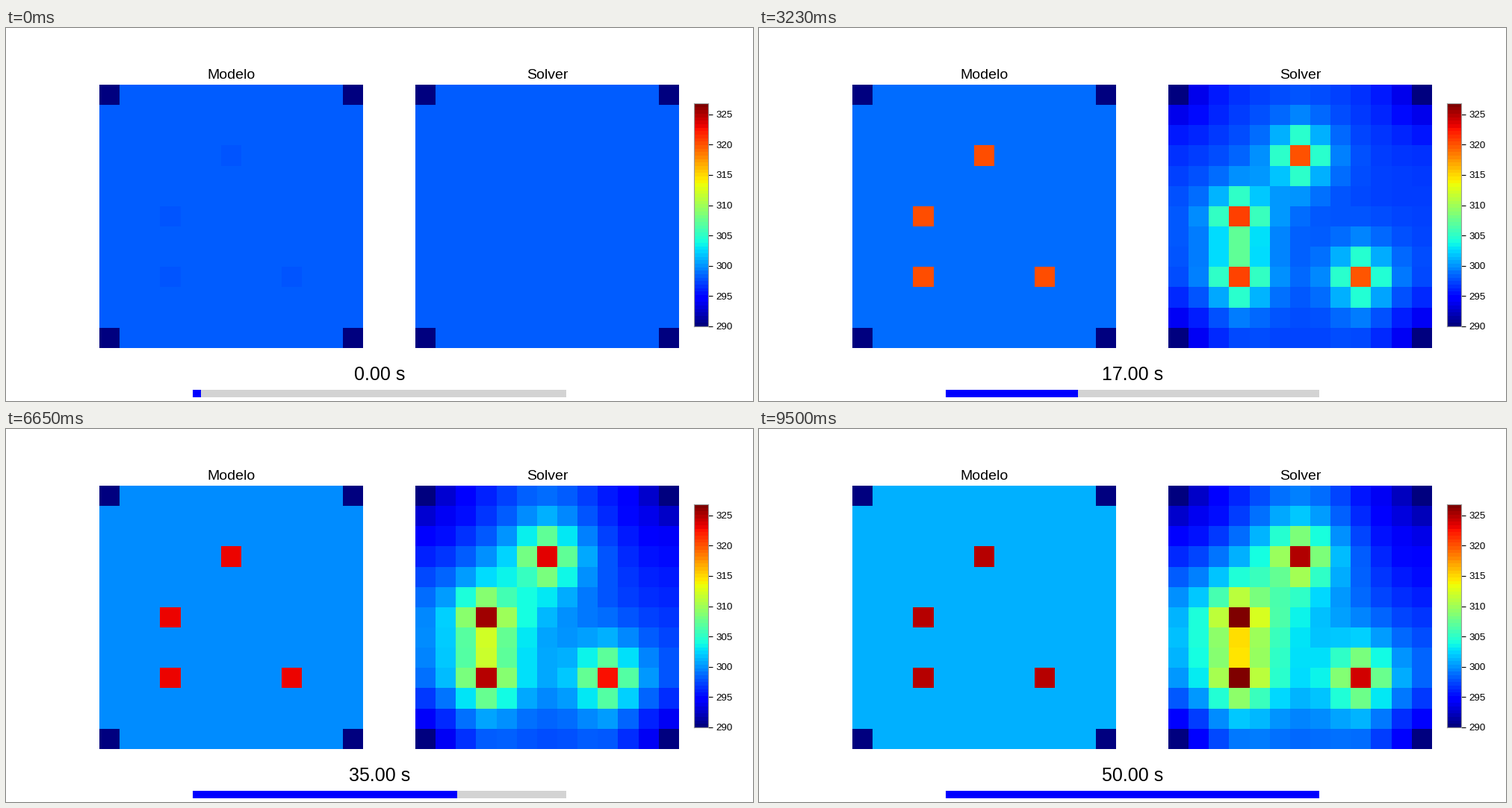
A matplotlib script for the animation above (9.69 s loop, 1000 px wide and 500 px high).

```python
import numpy as np
import matplotlib.pyplot as plt
from matplotlib.animation import FuncAnimation
from matplotlib.patches import Rectangle

W, H, DPI = 1000, 500, 100
N, FRAMES, STEP_MS = 13, 51, 190
T_MIN, T_MAX, T_START = 290.0, 326.8, 298.0
HEATERS = ([3, 6, 9, 9], [6, 3, 3, 9])  # rows, columns
CORNERS = ([0, 0, -1, -1], [0, -1, 0, -1])

plt.rcParams["font.family"] = "Liberation Sans"


def solve(conduct=0.1, heat=6.6, cool=0.07, t_env=250.0, substeps=40):
    """Plate temperatures at every second, by explicit finite differences."""
    temp = np.full((N, N), T_START)
    source = np.zeros((N, N))
    source[HEATERS] = heat
    loss = cool / (T_START**4 - t_env**4)
    dt = 1 / substeps
    fields = []
    for _ in range(FRAMES):
        temp[CORNERS] = T_MIN
        fields.append(temp.copy())
        for _ in range(substeps):
            p = np.pad(temp, 1, mode="edge")
            lap = p[:-2, 1:-1] + p[2:, 1:-1] + p[1:-1, :-2] + p[1:-1, 2:] - 4 * temp
            temp = temp + dt * (conduct * lap + source - loss * (temp**4 - t_env**4))
            temp[CORNERS] = T_MIN
    return fields


def predict(t):
    """Flat field with hot spots, as the model gives it."""
    temp = np.full((N, N), T_START + 2.95 * (t / 50) ** 1.45)
    temp[HEATERS] = 297.65 + 21.4 * (1 - np.exp(-t / 5)) + 0.12 * t
    temp[CORNERS] = T_MIN
    return temp


fig = plt.figure(figsize=(W / DPI, H / DPI), dpi=DPI, facecolor="white")
stage = fig.add_axes([0, 0, 1, 1])
stage.set(xlim=(0, W), ylim=(H, 0))
stage.axis("off")


def panel(x, title):
    ax = fig.add_axes([x / W, 1 - 429 / H, 353 / W, 353 / H])
    ax.axis("off")
    stage.text(x + 176.5, 68, title, size=14, ha="center", va="baseline")
    return ax.imshow(np.full((N, N), T_START), cmap="jet", vmin=T_MIN, vmax=T_MAX,
                     interpolation="nearest", aspect="auto")


def colorbar():
    ax = fig.add_axes([921 / W, 1 - 400 / H, 19 / W, 299 / H])
    ax.imshow(np.linspace(0, 1, 64)[:, None], cmap="jet", origin="lower",
              extent=(0, 1, T_MIN, T_MAX), interpolation="nearest", aspect="auto")
    ax.set_xticks([])
    ax.set_yticks(np.arange(290, 326, 5))
    ax.yaxis.tick_right()
    ax.tick_params(labelsize=9.6, length=4.2, width=0.8, pad=3.5)
    for side in ax.spines.values():
        side.set(color="0.6", linewidth=0.8)


def bar(x0, x1, color):
    return stage.add_patch(Rectangle((x0, 485), x1 - x0, 10, color=color,
                                     linewidth=0, antialiased=False))


model = panel(125, "Modelo")
solver = panel(548, "Solver")
colorbar()
bar(250, 750, "lightgray")
done = bar(250, 261, "blue")
clock = stage.text(500, 472, "", size=18, ha="center", va="baseline")
fields = solve()


def draw(i):
    model.set_data(predict(i))
    solver.set_data(fields[i])
    done.set_width(min(500, round(500 * (i + 1) / FRAMES) + 1))
    clock.set_text(f"{i:.2f} s")
    return model, solver, done, clock


anim = FuncAnimation(fig, draw, frames=FRAMES, interval=STEP_MS,
                     repeat=True, repeat_delay=0, blit=False)
plt.show()
```
